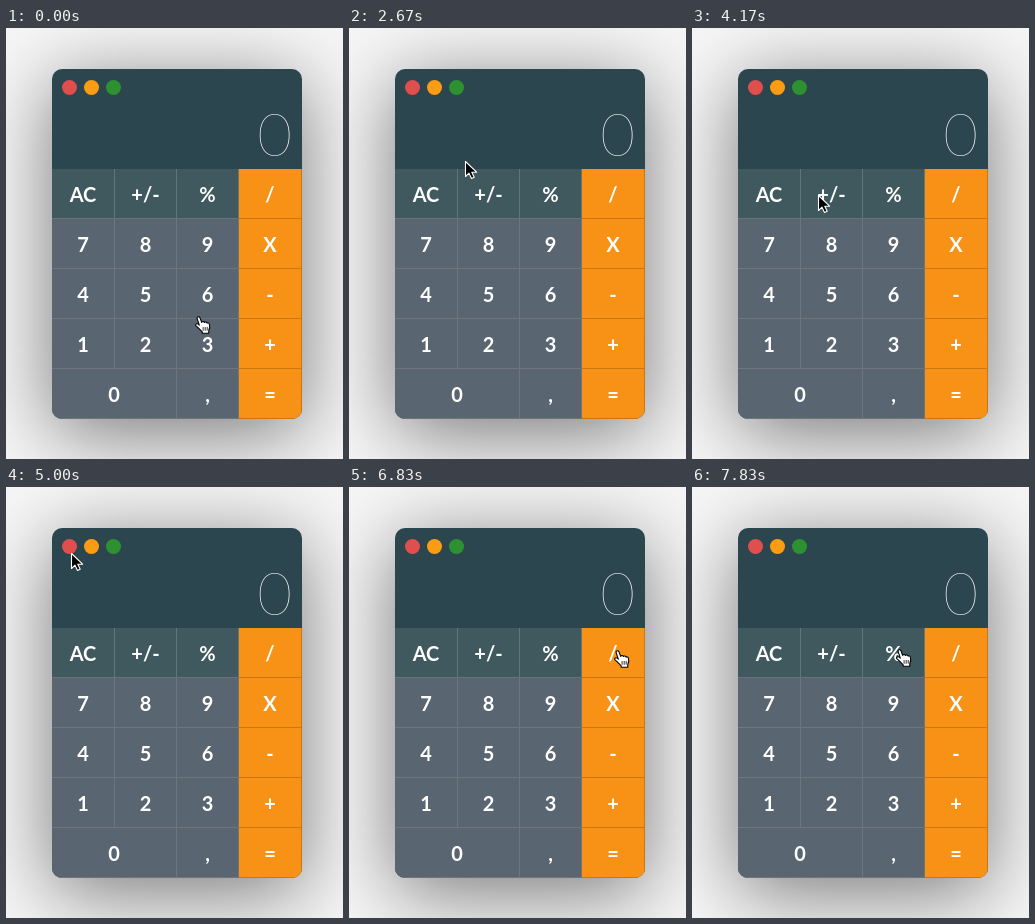
Animation of 337x431 px, one loop 8000 ms. Source, as an HTML page:

```html
<!DOCTYPE html>
<html lang="en">
<head>
<meta charset="utf-8">
<title>Calculator</title>
<style>
  html, body { margin: 0; width: 100%; height: 100%; overflow: hidden; background: #f6f6f6; }
  body { position: relative; }
  #calc {
    position: absolute; left: 46px; top: 41px; width: 250px; height: 350px;
    border-radius: 10px; background: #2c464f;
    box-shadow: 0 14px 80px rgba(0, 0, 0, .52);
  }
  #clip { position: absolute; inset: 0; border-radius: 10px; overflow: hidden; }
  .light { position: absolute; top: 10.5px; width: 15px; height: 15px; border-radius: 50%; }
  #value {
    position: absolute; right: 10px; top: 29px; line-height: 70px;
    font: 200 60px/70px Lato, sans-serif; color: #fff;
  }
  #keys {
    position: absolute; left: 0; top: 100px; width: 250px; height: 250px;
    display: grid; grid-template: repeat(5, 50px) / 63px 62px 62px 63px;
  }
  .key {
    box-sizing: border-box; text-align: center; color: #fff; background: #596571;
    border: solid #70747c; border-width: 0 1px 1px 0;
    font: 700 20px/50px Lato, sans-serif;
  }
  .top { background: #40595f; border-color: #647578; }
  .op { background: #f79216; border-color: #cd750f; }
  .wide { grid-column: span 2; }
  #pointer { position: absolute; left: 0; top: 0; width: 24px; height: 24px; overflow: visible; }
</style>
</head>
<body>
<div id="calc">
  <div id="clip">
    <i class="light" style="left:10px;background:#e04e4e"></i>
    <i class="light" style="left:32px;background:#fb9c12"></i>
    <i class="light" style="left:54px;background:#2d9132"></i>
    <div id="value">0</div>
    <div id="keys"></div>
  </div>
</div>
<svg id="pointer" stroke-linejoin="round" stroke-linecap="round">
  <path id="arrow" fill="#000" stroke="#fff" stroke-width="1.1"
    d="M.5 .5V15.5L4 12.2L6.5 17.5L9.2 16.3L6.8 11.2H11.6Z"/>
  <g id="hand" stroke="#000" stroke-width="1.1">
    <path fill="#fff" d="M-1 1.2C-1-.6 1.4-.7 2 .9L3.7 5.4C4.2 4.2 6 4.3 6.4 5.5C7.1 4.6 8.7 4.9 9.1 6.1
      C10 5.5 11.2 6.1 11.4 7.2C12 9.4 12 11.4 10.8 13.3V16.3H4.2V14.8C2.5 13.2 .2 10.4-2.2 8.6
      C-3 7.1-1 6.2 .2 7.2L1.3 8.1Z"/>
    <path fill="none" stroke-width=".8" d="M5.1 10.5V13.4M7.2 10.4V13.4M9.2 10.3V13.2"/>
  </g>
</svg>
<script>
const $ = id => document.getElementById(id);
const LOOP = 8000, FPS = 6;

for (const label of "AC +/- % / 7 8 9 X 4 5 6 - 1 2 3 + 0 , =".split(" ")) {
  const key = document.createElement("div");
  const kind = ["AC", "+/-", "%"].includes(label) ? "top" : "/X-+=".includes(label) ? "op" : "";
  key.className = `key ${kind} ${label === "0" ? "wide" : ""}`;
  key.textContent = label;
  $("keys").append(key);
}

// time, x, y, hand
const path = [
  [0, 192, 289, 1], [167, 160, 215, 1], [333, 118, 141, 0], [2500, 118, 141, 0],
  [2667, 116, 133, 0], [4167, 126, 167, 0], [5000, 65, 66, 0], [6000, 80, 78, 0],
  [6500, 195, 130, 0], [6833, 268, 164, 1], [7833, 207, 163, 1], [8000, 207, 163, 1]
];

function draw(now) {
  // the pointer is sampled six times a second
  const step = Math.floor((now % LOOP) * FPS / 1000 + .03);
  const t = Math.min(step * 1000 / FPS, LOOP - 1) + .5;
  const i = path.findIndex(p => p[0] > t) - 1;
  const [t0, x0, y0, hand] = path[i], [t1, x1, y1] = path[i + 1];
  const u = (t - t0) / (t1 - t0);
  const x = x0 + (x1 - x0) * u, y = y0 + (y1 - y0) * u;
  $("pointer").style.transform = `translate(${Math.round(x)}px, ${Math.round(y)}px)`;
  $("hand").style.display = hand ? "" : "none";
  $("arrow").style.display = hand ? "none" : "";
}

const start = performance.now();
function tick() {
  draw(performance.now() - start);
  requestAnimationFrame(tick);
}
tick();
</script>
</body>
</html>
```
